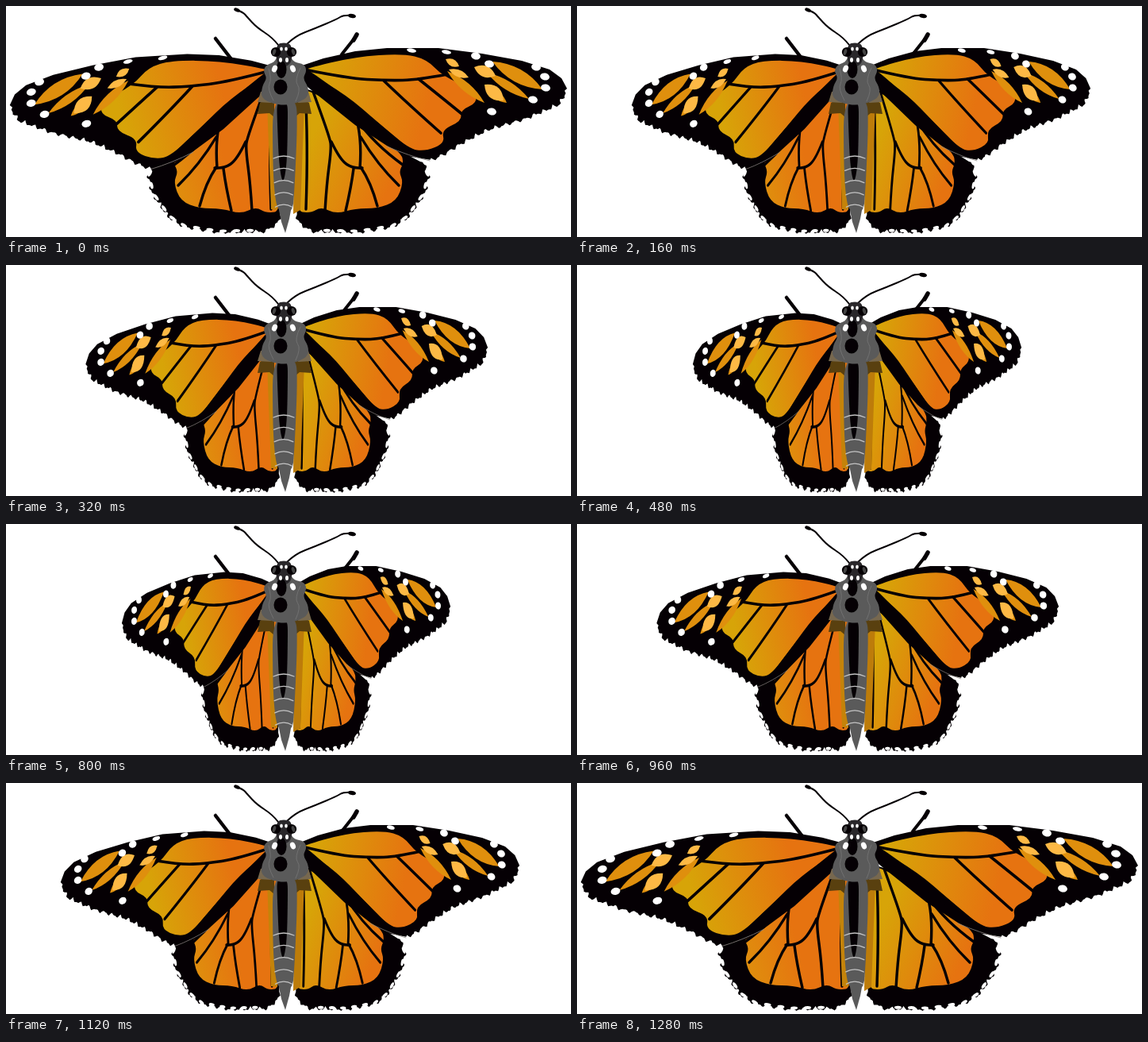
Recreate the animation shown at these times as an HTML page with a canvas. Size 712x291 px, loop 2880 ms.

```html
<!DOCTYPE html>
<html lang="en">
<head>
<meta charset="utf-8">
<title>Butterfly</title>
<style>
html, body { margin: 0; width: 100%; height: 100%; overflow: hidden; background: #fff; }
canvas { display: block; }
</style>
</head>
<body>
<canvas id="stage" width="712" height="291"></canvas>
<script>
const ctx = document.getElementById('stage').getContext('2d');
const LOOP = 2880, STEP = 160, DEEPEST = 4;
const BLACK = '#050004', GOLD = '#d7a408', AMBER = '#df8f0d', ORANGE = '#e67310';
const SPOT = '#fdb945', GREY = '#5a5a5a';

// The right wing is the model; the left one is its mirror image, with the forewing tilted.
const LEFT = { pivot: 340, mirror: true, squeeze: [1, 0.809, 0.715, 0.579, 0.45] };
const RIGHT = { pivot: 359, mirror: false, squeeze: [1, 0.828, 0.713, 0.578, 0.45] };
const TILT = -0.06;

const points = text => text.split(' ').map(s => s.split(',').map(Number));
const between = (a, b, k = 0.5) => [a[0] + (b[0] - a[0]) * k, a[1] + (b[1] - a[1]) * k];

function poly(list) {
  const path = new Path2D();
  list.forEach(p => path.lineTo(...p));
  path.closePath();
  return path;
}
function blob(text) {
  const list = points(text), path = new Path2D();
  path.moveTo(...between(list[list.length - 1], list[0]));
  list.forEach((p, i) => path.quadraticCurveTo(...p, ...between(p, list[(i + 1) % list.length])));
  return path;
}
function curve(text) {
  const list = points(text), path = new Path2D(), last = list.length - 1;
  path.moveTo(...list[0]);
  for (let i = 1; i < last; i++) {
    path.quadraticCurveTo(...list[i], ...(i === last - 1 ? list[last] : between(list[i], list[i + 1])));
  }
  if (last === 1) path.lineTo(...list[1]);
  return path;
}
// Lens shape from one end to the other
function leaf(text, width) {
  const [a, b] = points(text), [x, y] = between(a, b);
  const size = Math.hypot(b[0] - a[0], b[1] - a[1]);
  const nx = (a[1] - b[1]) / size * width, ny = (b[0] - a[0]) / size * width;
  const path = new Path2D();
  path.moveTo(...a);
  path.quadraticCurveTo(x + nx, y + ny, ...b);
  path.quadraticCurveTo(x - nx, y - ny, ...a);
  return path;
}

function fill(path, color) {
  ctx.fillStyle = color;
  ctx.fill(path);
}
function stroke(path, width, color = BLACK) {
  ctx.lineWidth = width;
  ctx.strokeStyle = color;
  ctx.stroke(path);
}
function oval(x, y, rx, ry, color, turn = 0) {
  const path = new Path2D();
  path.ellipse(x, y, rx, ry, turn, 0, Math.PI * 2);
  fill(path, color);
}
function fade(x0, y0, x1, y1, from, to) {
  const g = ctx.createLinearGradient(x0, y0, x1, y1);
  g.addColorStop(0, from);
  g.addColorStop(1, to);
  return g;
}

// Evenly spaced places along a line of corners, with the direction there
function walk(text, gap) {
  const list = points(text), out = [];
  let travelled = 0, next = 0;
  for (let i = 1; i < list.length; i++) {
    const [a, b] = [list[i - 1], list[i]];
    const size = Math.hypot(b[0] - a[0], b[1] - a[1]);
    for (; next <= travelled + size; next += gap) {
      const [x, y] = between(a, b, (next - travelled) / size);
      out.push({ x, y, d: next, angle: Math.atan2(b[1] - a[1], b[0] - a[0]) });
    }
    travelled += size;
  }
  return out;
}
function scallop(text, wave, depth) {
  return walk(text, 2).map(({ x, y, d, angle }) => {
    const out = depth * (Math.abs(Math.sin(Math.PI * d / wave)) - 0.6 + 0.25 * Math.sin(d * 0.9));
    return [x + Math.sin(angle) * out, y - Math.cos(angle) * out];
  });
}

const HIND_RIM = '524,195 533,212 528,236 507,266 488,278 445,285 385,284 369,273 366,262';
const FORE_RIM = '706,108 697,124 655,142 607,156 576,172 550,188 534,195';

const hind = {
  edge: poly([...points('363,100 390,108 440,143 486,177'), ...scallop(HIND_RIM, 15, 4)]),
  cell: blob('363,104 388,108 447,145 498,185 501,198 495,209 501,222 492,246 468,255 440,255 416,262 397,253 384,261 363,258'),
  veins: [
    '377,106 381,170 378,256', '387,108 408,165 410,180 404,225 402,258', '410,171 421,194 438,205 449,204',
    '438,205 435,228 428,258', '447,203 460,222 468,252', '440,137 449,164 446,204',
    '447,165 468,200 495,226', '442,143 464,174 500,200'
  ].map(curve),
  marks: walk(HIND_RIM, 17).slice(1, -2)
};

const fore = {
  edge: poly([...points('364,78 400,66 440,57 480,53 545,53 600,60 650,69 685,80 700,91 707,104'),
    ...scallop(FORE_RIM, 13, 4), ...points('505,189 480,176 440,150 405,122 370,94')]),
  cell: blob('377,79 440,64 500,60 530,67 550,88 590,106 594,122 573,131 574,145 549,156 553,173 528,183 508,180 468,146 430,113 378,82'),
  veins: ['376,80 430,91 480,94 520,93 556,86', '476,94 505,122 548,160', '520,92 545,112 577,138'].map(curve),
  band: curve('376,83 430,119 505,183'),
  rim: curve('480,177 508,189 534,195'),
  streaks: [['613,70 676,105', 17], ['606,84 659,117', 11], ['556,82 603,122', 11], ['608,104 631,122', 9]],
  spots: [['590,77 617,88', 14], ['603,99 627,119', 16], ['554,67 571,76', 9], ['558,80 583,90', 9]],
  dots: points('511,56 555,58 592,63 609,73 668,77 679,89 680,103 664,118 612,133')
};

function drawHind(tint) {
  fill(hind.edge, BLACK);
  fill(hind.cell, tint);
  hind.veins.forEach(v => stroke(v, 3.4));
  hind.marks.forEach(({ x, y, angle }) =>
    oval(x - Math.sin(angle) * 1.5, y + Math.cos(angle) * 1.5, 4.5, 2, '#fff', angle));
}

function drawFore(tint) {
  fill(fore.edge, BLACK);
  fill(fore.cell, tint);
  fore.veins.forEach(v => stroke(v, 3.6));
  stroke(fore.band, 9);
  stroke(fore.rim, 0.8, '#8a8580');
  fore.streaks.forEach(([ends, w]) => fill(leaf(ends, w), AMBER));
  fore.spots.forEach(([ends, w]) => fill(leaf(ends, w), SPOT));
  fore.dots.forEach(([x, y], i) => oval(x, y, 6, i < 2 ? 2.5 : 4.5, '#fff', 0.2));
}

function drawWing({ pivot, mirror, squeeze }, pose) {
  ctx.save();
  ctx.translate(pivot, 0);
  ctx.scale(squeeze[pose], 1);
  ctx.translate(-pivot, 0);
  if (mirror) {
    ctx.translate(712, 0);
    ctx.scale(-1, 1);
  }
  drawHind(mirror ? fade(510, 200, 440, 180, AMBER, ORANGE) : fade(385, 165, 490, 215, GOLD, ORANGE));
  if (mirror) {
    ctx.translate(358, 85);
    ctx.rotate(-TILT);
    ctx.translate(-356, -85);
  }
  drawFore(mirror ? fade(570, 120, 440, 90, GOLD, ORANGE) : fade(390, 100, 530, 135, GOLD, ORANGE));
  ctx.restore();
}

function drawLimbs() {
  stroke(curve('343,49 336,40 316,27 304,14 299,8 291,5'), 2);
  stroke(curve('354,48 364,38 390,28 416,17 426,11 437,12'), 2);
  oval(291, 5, 4, 2.3, BLACK, 0.4);
  oval(436, 12.5, 5, 2.6, BLACK, 0.2);
  stroke(curve('264,41 284,67'), 4.5);
  stroke(curve('442,37 423,61'), 4);
  stroke(curve('442,36 438,43'), 5.5);
}

function drawBody() {
  fill(poly(points('329,122 338,122 342,257 334,256')), '#c4830a');
  fill(poly(points('364,122 376,122 371,257 362,262')), '#bd7c0a');
  for (const side of [-1, 1]) {
    const x = u => 351 + side * u;
    fill(poly([[x(34), 136], [x(31), 122], [x(20), 116], [x(13), 120], [x(13), 140], [x(19), 135]]), '#59400f');
    fill(poly([[x(34), 121], [x(30), 108], [x(20), 106], [x(17), 122]]), '#77684f');
  }
  fill(blob('336,116 366,116 367,150 365,200 363,238 361,260 343,260 338,235 336,190'), GREY);
  fill(poly(points('343,252 360,252 357,268 352,286 347,272')), GREY);
  fill(blob('341,118 355,118 355,150 354,200 349,226 344,200 342,150'), BLACK);
  for (let i = 0; i < 5; i++) {
    const y = 190 + i * 15.3, w = 13 - i * 0.6;
    stroke(curve(`${350 - w},${y + 2} 350,${y - 4} ${350 + w},${y + 2}`), 1.3, '#c4c4c4');
  }
  fill(blob('342,63 358,63 363,71 376,73 379,82 374,91 381,102 381,114 370,121 355,125 338,124 321,116 323,100 329,91 324,82 328,74 338,71'), GREY);
  stroke(curve('331,79 335,92 329,104 337,119'), 0.8, '#777');
  stroke(curve('371,78 363,94 372,105 365,120'), 0.8, '#777');
  fill(blob('341,48 350,46 360,48 361,66 356,76 344,76 340,66'), '#29272a');
  oval(347, 80, 6.5, 11, BLACK);
  oval(346, 102, 8.5, 9.5, BLACK);
  for (const side of [-1, 1]) {
    oval(350 + side * 10, 58, 6.2, 6, BLACK);
    oval(350 + side * 12, 58, 2, 4, '#444', side * -0.3);
    oval(350 + side * 3, 54, 1.8, 2.5, '#fff');
    oval(350 + side * 4, 68, 2, 3, '#fff');
    oval(350 + side * 11.5, 79, 3.3, 4.5, '#fff', side * -0.4);
  }
}

function draw(time) {
  const step = Math.min(Math.floor(time % LOOP / STEP), 2 * DEEPEST);
  const pose = DEEPEST - Math.abs(DEEPEST - step);
  ctx.fillStyle = '#fff';
  ctx.fillRect(0, 0, 712, 291);
  ctx.lineCap = ctx.lineJoin = 'round';
  drawLimbs();
  drawWing(LEFT, pose);
  drawWing(RIGHT, pose);
  drawBody();
}

const start = performance.now();
function tick() {
  draw(performance.now() - start);
  requestAnimationFrame(tick);
}
tick();
</script>
</body>
</html>
```
